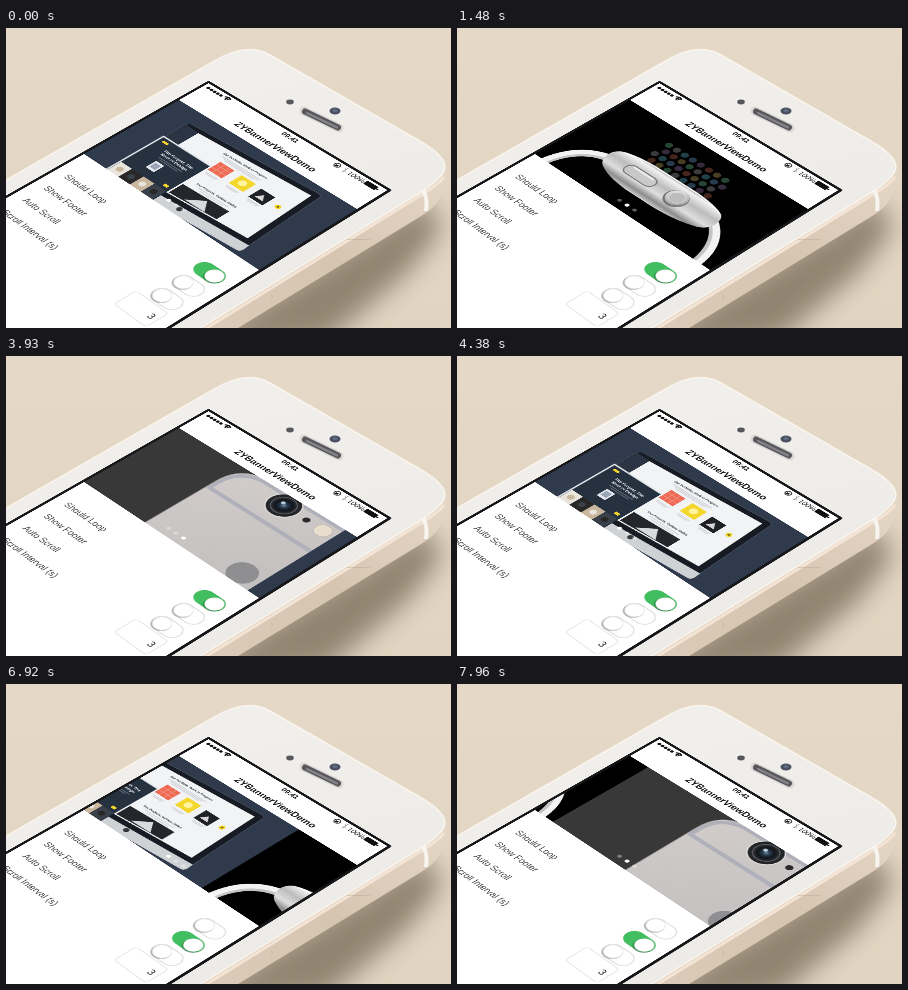
An HTML page for the animation above (7990 ms loop, 445x300 px).

```html
<!DOCTYPE html>
<html lang="en">
<head>
<meta charset="utf-8">
<title>Banner demo</title>
<style>
html, body { margin: 0; width: 100%; height: 100%; overflow: hidden; background: #e5d8c6; }
svg { display: block; }
#stage { position: relative; width: 100%; height: 100%; overflow: hidden; contain: strict; }
#body { position: absolute; left: 0; top: 0; width: 100%; height: 100%; }
#plane { position: absolute; left: 0; top: 0; width: 0; height: 0; transform-origin: 0 0; }
#screen { position: absolute; left: -20px; top: -84px; }
text { font-family: "Liberation Sans", Arial, sans-serif; }
</style>
</head>
<body>
<div id="stage">
<svg id="body" viewBox="0 0 445 300">
  <defs>
    <linearGradient id="bg" x2="0" y2="1">
      <stop stop-color="#e6d8c6"/><stop offset="1" stop-color="#e1d4c1"/>
    </linearGradient>
    <linearGradient id="face" x2=".4" y2="1">
      <stop stop-color="#f2f0ed"/><stop offset="1" stop-color="#edebe8"/>
    </linearGradient>
    <linearGradient id="side" x1="1" x2="0" y2="1">
      <stop stop-color="#e6d8c7"/><stop offset=".5" stop-color="#d6c5b1"/><stop offset="1" stop-color="#dccbb8"/>
    </linearGradient>
    <filter id="soft" x="-30%" y="-30%" width="160%" height="160%"><feGaussianBlur stdDeviation="13"/></filter>
  </defs>
  <rect width="445" height="300" fill="url(#bg)"/>
  <path d="M420 172 L436 200 L402 244 L322 312 L190 325 L232 288Z" fill="#887c68" opacity=".9" filter="url(#soft)"/>
  <path d="M438 136 Q440 158 434 170 Q430 179 412 190 L340 234 L232 300 H180 L400 150Z" fill="url(#side)"/>
  <path d="M0 152 L205 35 Q240 13 264 27 L412 112 Q446 131 437 145 Q433 152 420 161 L192 302 H0Z" fill="url(#face)"/>
  <path d="M0 152 L205 35 Q240 13 264 27 L412 112 Q446 131 437 145 Q433 152 420 161 L192 302" fill="none" stroke="#f9f4ec" stroke-width="1.500"/>
  <path d="M438 149 Q433 156 420 164 L196 303" fill="none" stroke="#f3e4d5" stroke-width="3"/>
  <path d="M417 162 Q422 170 420 183" fill="none" stroke="#f8f4ef" stroke-width="4"/>
  <path d="M341 211.500 H364 M265 266 q3 2 0 6" fill="none" stroke="#b9a994" stroke-width=".8" opacity=".6"/>
  <g stroke-linecap="round">
    <path d="M298 83 L333 100" stroke="#dbd8d4" stroke-width="9"/>
    <path d="M299 83.500 L332 99.500" stroke="#58585d" stroke-width="6"/>
    <path d="M301 85 L331 99.500" stroke="#85858a" stroke-width="2"/>
  </g>
  <ellipse cx="329" cy="83" rx="5.500" ry="3.400" fill="#4a5163"/>
  <ellipse cx="329" cy="82.500" rx="2.600" ry="1.600" fill="#626b80"/>
  <ellipse cx="284" cy="74" rx="3.800" ry="2.400" fill="#56565b"/>
</svg>

<div id="plane">
<svg id="screen" width="415" height="700" viewBox="-20 -84 415 700">
  <defs>
    <linearGradient id="steel" x2="0" y2="1">
      <stop stop-color="#8b8b8b"/><stop offset=".1" stop-color="#f3f3f3"/><stop offset=".38" stop-color="#bcbcbc"/>
      <stop offset=".65" stop-color="#dedede"/><stop offset=".85" stop-color="#8c8c8c"/><stop offset="1" stop-color="#cfcfcf"/>
    </linearGradient>
    <linearGradient id="knob" x2="1" y2="1">
      <stop stop-color="#f0f0f0"/><stop offset="1" stop-color="#929292"/>
    </linearGradient>
    <linearGradient id="back" x2="1" y2="1">
      <stop stop-color="#d2cdcb"/><stop offset="1" stop-color="#c2bfbf"/>
    </linearGradient>
    <radialGradient id="lens">
      <stop stop-color="#6d8ba4"/><stop offset=".3" stop-color="#27394b"/><stop offset=".65" stop-color="#10151b"/><stop offset="1" stop-color="#2c2d30"/>
    </radialGradient>
    <g id="desk">
      <rect width="376" height="200" fill="#2f3a4c"/>
      <path d="M60 30 L312 14 Q319 14 319.500 20 L327 172 L57 194 L54 38 Q54 31 60 30Z" fill="#171c24" stroke="#4d5664" stroke-width="1.200"/>
      <path d="M57 191 L327 172 L328 184 Q328 191 321 192 L150 205 H57Z" fill="#cfd2d5"/>
      <circle cx="198" cy="187" r="5" fill="#34373b"/>
      <path d="M67 39 L308 25 L314 162 L66 180Z" fill="#f2f3f5"/>
      <path d="M56 36 L83 38 V90 H56Z" fill="#2a3443"/>
      <g font-weight="700" text-anchor="middle" fill="#2b2f36">
        <text x="191" y="46" font-size="6" transform="rotate(-2 191 46)">Our Portfolio, Work in Progress</text>
        <text x="212" y="127" font-size="6" transform="rotate(-2 212 127)">Our Projects, Various Styles</text>
      </g>
      <g id="lines" stroke="#b4b8bf" stroke-width="1"></g>
      <rect x="158" y="64" width="30" height="27" fill="#ee6a55"/>
      <rect x="203" y="64" width="30" height="27" fill="#f3d72c"/>
      <rect x="246" y="66" width="29" height="27" fill="#1f2126"/>
      <path d="M158 73h30M158 82h30M168 64v27M178 64v27" stroke="#f6a190"/>
      <circle cx="218" cy="77" r="7" fill="#fff3a0"/>
      <path d="M252 86 l8-12 9 12z" fill="#d6d6d6"/>
      <circle cx="293" cy="79" r="5" fill="#f4d31f"/>
      <circle cx="293" cy="79" r="2" fill="#6b611f"/>
      <path d="M158 142 L252 138 V164 L158 171Z" fill="#24262b"/>
      <path d="M186 166 L212 144 L228 165Z" fill="#d9dadd"/>
      <path d="M52 82 H155 V202 H52Z" fill="#263140"/>
      <path d="M52 202 V82 H155" fill="none" stroke="#e4e7eb" stroke-width="3"/>
      <rect x="60" y="89" width="12" height="5" fill="#f0d22b"/>
      <rect x="139" y="160" width="9" height="6" fill="#f0d22b"/>
      <g font-weight="700" font-size="8" text-anchor="middle" fill="#fff">
        <text x="110" y="108">The Project, The</text>
        <text x="110" y="117">Best of Design</text>
      </g>
      <path d="M84 123h52M90 127h40" stroke="#8d97a5"/>
      <rect x="89" y="132" width="18" height="22" rx="2" fill="#e6e9ee"/>
      <rect x="92" y="136" width="12" height="13" fill="#9aa6b5"/>
      <g id="tiles"></g>
    </g>
    <g id="watch">
      <rect width="376" height="200" fill="#000"/>
      <g id="apps" opacity=".5"></g>
      <path d="M22 206 C28 165 48 134 90 125" fill="none" stroke="#c5c5c7" stroke-width="16"/>
      <path d="M20 206 C25 163 46 131 90 121" fill="none" stroke="#f3f3f4" stroke-width="11"/>
      <path d="M303 121 C330 140 346 168 350 206" fill="none" stroke="#c5c5c7" stroke-width="16"/>
      <path d="M303 118 C333 138 350 166 353 206" fill="none" stroke="#f3f3f4" stroke-width="11"/>
      <path d="M78 116 Q80 102 94 97 Q118 89 150 88 H238 Q278 90 298 100 Q309 108 308 126 Q306 140 292 146 Q260 159 210 160 H158 Q112 157 90 143 Q77 133 78 116Z" fill="url(#steel)"/>
      <path d="M94 99 Q118 91 150 90 H238 Q276 92 296 101" fill="none" stroke="#fff" stroke-width="2"/>
      <rect x="119" y="110" width="62" height="23" rx="11" fill="#c9c9c9" stroke="#777" stroke-width="2"/>
      <path d="M130 114h40" stroke="#f5f5f5" stroke-width="3" stroke-linecap="round"/>
      <circle cx="226" cy="121" r="20" fill="#747474"/>
      <circle cx="226" cy="119" r="18" fill="url(#knob)"/>
      <circle cx="226" cy="119" r="13" fill="#bdbdbd" stroke="#e5e5e5"/>
    </g>
    <g id="rear">
      <rect width="376" height="200" fill="#383838"/>
      <path d="M160 201 V54 Q160 -3 218 -3 H376 V201Z" fill="url(#back)" stroke="#8e8c8d" stroke-width="1.500"/>
      <path d="M162 72 H376 M165 72 V54 Q166 4 218 3 H376" fill="none" stroke="#b0b0ba" stroke-width="8"/>
      <circle cx="273" cy="23" r="29" fill="#e1dedc"/>
      <circle cx="273" cy="23" r="27" fill="#242528"/>
      <circle cx="273" cy="23" r="21" fill="#55595f"/>
      <circle cx="273" cy="23" r="19" fill="url(#lens)"/>
      <circle cx="268" cy="19" r="3.500" fill="#b9cbd9"/>
      <circle cx="320" cy="24" r="6" fill="#2a2a2d"/>
      <circle cx="354" cy="25" r="14" fill="#e8dccd" stroke="#b5aca6"/>
      <circle cx="342" cy="178" r="24" fill="#8f8e91"/>
    </g>
  </defs>
  <rect x="-5" y="-69" width="385" height="700" rx="4" fill="#17171a"/>
  <rect y="-64" width="375" height="690" fill="#fff"/>

  <g id="status" fill="#111">
    <path d="M43 -58 Q50 -65 57 -58 L50 -50Z"/>
    <path d="M44 -55 Q50 -60 56 -55 M46.500 -52.500 Q50 -55.500 53.500 -52.500" fill="none" stroke="#fff"/>
    <text x="187.500" y="-50" font-size="12.500" font-weight="700" text-anchor="middle">09:41</text>
    <circle cx="284" cy="-55" r="5" fill="none" stroke="#111" stroke-width="1.500"/>
    <rect x="281.500" y="-56" width="5" height="4"/>
    <path d="M297 -58 l6 6 -3 3 v-12 l3 3 -6 6" fill="none" stroke="#777"/>
    <text x="307" y="-50.500" font-size="12.500">100%</text>
    <rect x="340" y="-60" width="22" height="10" rx="2"/>
    <rect x="363" y="-57" width="2" height="4"/>
  </g>
  <text x="187.500" y="-16" font-size="17" font-weight="700" text-anchor="middle" fill="#151515">ZYBannerViewDemo</text>

  <svg width="375" height="200">
    <g id="track">
      <use href="#desk"/>
      <use href="#watch" x="375"/>
      <use href="#rear" x="750"/>
      <use href="#desk" x="1125"/>
    </g>
    <g id="dots"></g>
  </svg>

  <g id="rows" font-size="16" fill="#444"></g>
  <rect x="289" y="358" width="66" height="42" rx="5" fill="#fff" stroke="#e2e2e2" stroke-width="1.500"/>
  <text x="348" y="385" font-size="16" text-anchor="end" fill="#222">3</text>
</svg>
</div>
</div>

<script>
const $ = id => document.getElementById(id);
const NS = "http://www.w3.org/2000/svg";
function add(parent, tag, attrs, text) {
  const el = document.createElementNS(NS, tag);
  for (const k in attrs) el.setAttribute(k, attrs[k]);
  if (text) el.textContent = text;
  parent.appendChild(el);
  return el;
}

// Maps a w x h box onto four corners: top left, top right, bottom right, bottom left.
function project(w, h, [x0, y0], [x1, y1], [x2, y2], [x3, y3]) {
  const sx = x0 - x1 + x2 - x3, sy = y0 - y1 + y2 - y3;
  const ax = x1 - x2, ay = y1 - y2, bx = x3 - x2, by = y3 - y2;
  const det = ax * by - bx * ay;
  const g = (sx * by - bx * sy) / det, k = (ax * sy - sx * ay) / det;
  const m = [
    (x1 - x0 + g * x1) / w, (y1 - y0 + g * y1) / w, 0, g / w,
    (x3 - x0 + k * x3) / h, (y3 - y0 + k * y3) / h, 0, k / h,
    0, 0, 1, 0, x0, y0, 0, 1];
  return `matrix3d(${m.map(n => n.toFixed(8)).join()})`;
}
$("plane").style.transform = project(375, 200, [173, 72], [351, 181], [253, 242], [78, 126]);

for (let i = 0; i < 5; i++) add($("status"), "circle", { cx: 9 + i * 7, cy: -55, r: 3 });

// Small print and picture tiles on the desktop display
for (let i = 0; i < 3; i++) {
  const x = 160 + i * 44;
  add($("lines"), "path", { d: `M${x} 97h26M${x + 3} 100h20` });
  add($("lines"), "path", { d: `M${150 + i * 5} ${52 + i * 3}h${82 - i * 10}` });
}
add($("lines"), "path", { d: "M180 132h64M188 136h48" });
const tones = ["#e9e4dc", "#2a2827", "#c8b79d", "#39404a"];
for (let i = 0; i < 4; i++) {
  add($("tiles"), "rect", { x: 54 + i * 25, y: 172, width: 24, height: 30, fill: tones[i] });
  add($("tiles"), "circle", { cx: 66 + i * 25, cy: 186, r: 6, fill: tones[(i + 2) % 4] });
}

// Dim app icons on the watch face
const hues = ["#4f8a6a", "#8c4a3d", "#51779c", "#77777c", "#8c7a46", "#6d557f", "#3f8490"];
for (let r = 0; r < 4; r++) {
  for (let c = 0; c < 8; c++) {
    add($("apps"), "circle", {
      cx: 126 + c * 17 + (r % 2) * 8.5, cy: 38 + r * 15, r: 6.2, fill: hues[(c * 3 + r * 5) % 7]
    });
  }
}

const dots = [0, 1, 2].map(i => add($("dots"), "circle", { cx: 171.5 + i * 16, cy: 184, r: 3.6, fill: "#fff" }));

const labels = ["Should Loop", "Show Footer", "Auto Scroll", "Scroll Interval (s)"];
const switches = [];
labels.forEach((label, i) => {
  const y = 255 + i * 41.5;
  add($("rows"), "text", { x: 21, y: y + 6 }, label);
  if (i === 3) return;
  const g = add($("rows"), "g", { transform: `translate(306 ${y - 15.5})` });
  add(g, "rect", { width: 51, height: 31, rx: 15.5, fill: "#fff", stroke: "#dfdfdf", "stroke-width": 1.8 });
  const on = add(g, "rect", { x: -.5, y: -.5, width: 52, height: 32, rx: 16, fill: "#41bf60" });
  const knob = add(g, "g", {});
  add(knob, "circle", { cx: 15.5, cy: 18, r: 15, fill: "#000", opacity: .2 });
  add(knob, "circle", { cx: 15.5, cy: 15.5, r: 14, fill: "#fff", stroke: "#cfcfcf", "stroke-width": .8 });
  switches.push(k => {
    on.setAttribute("opacity", k);
    knob.setAttribute("transform", `translate(${20 * k} 0)`);
  });
});

const LOOP = 7990, TICK = 30;
const ease = x => (1 - Math.cos(Math.PI * Math.min(1, Math.max(0, x)))) / 2;
// start, lead-in, duration, from page, to page
const slides = [
  [1000, 70, 550, 0, 1],
  [2480, 110, 530, 1, 2],
  [3930, 84, 530, 2, 3],
  [6770, 40, 505, 0, 1],
  [7690, 115, 490, 1, 2]
];
const progress = (t, start, lead, span) =>
  t < start ? 0 : ease((Math.floor((t - start) / TICK) * TICK + lead) / span);

function draw(t) {
  let pos = 0, page = 0;
  for (const [start, lead, span, from, to] of slides) {
    if (t < start) break;
    const p = progress(t, start, lead, span);
    pos = from + (to - from) * p;
    page = p < 1 ? from : to % 3;
  }
  $("track").setAttribute("transform", `translate(${-375 * pos} 0)`);
  dots.forEach((d, i) => d.setAttribute("opacity", i === page ? 1 : .35));
  const k = progress(t, 5380, 30, 330);
  switches[0](1 - k);
  switches[1](k);
  switches[2](0);
}

const begin = performance.now();
function frame() {
  draw((performance.now() - begin) % LOOP);
  requestAnimationFrame(frame);
}
draw(0);
requestAnimationFrame(frame);
</script>
</body>
</html>
```
